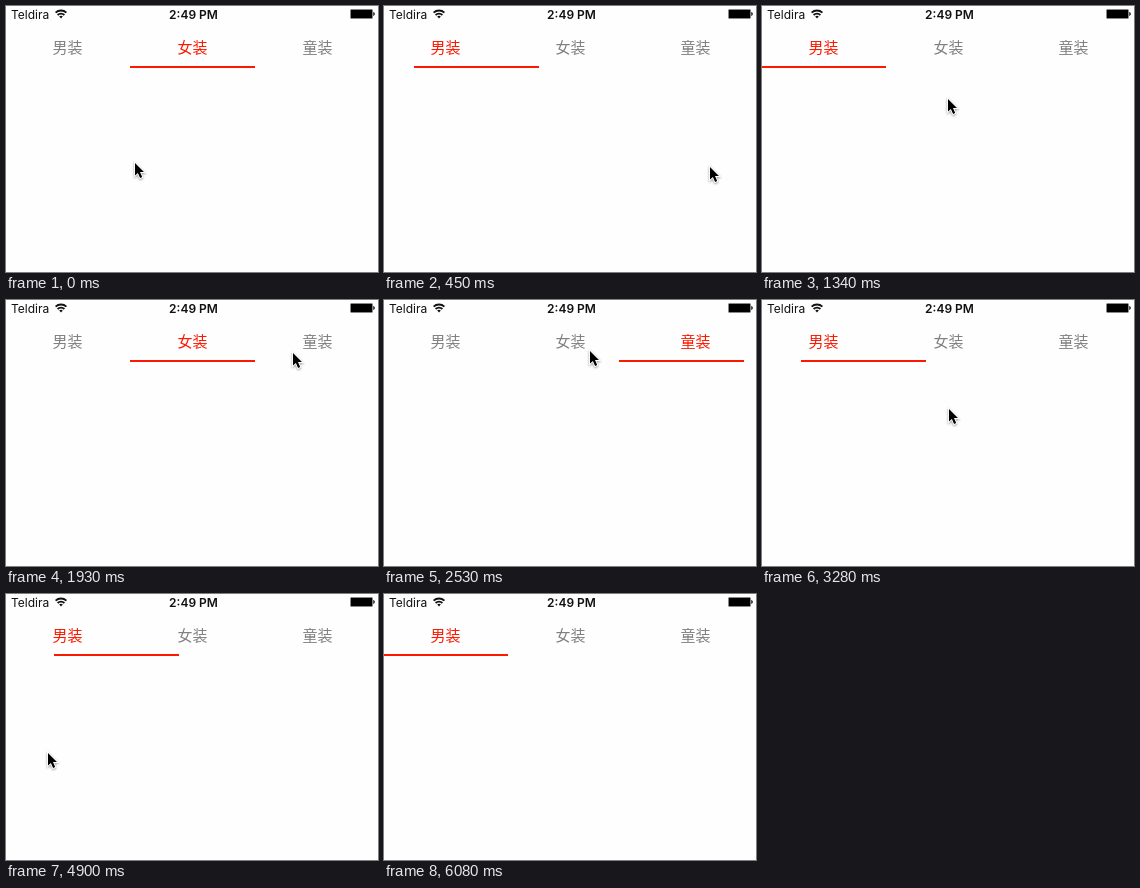
An HTML page for the animation above (6.68 s loop, 372 by 266 pixels).

```html
<!DOCTYPE html>
<html lang="zh-CN">
<head>
<meta charset="utf-8">
<title>Tabs</title>
<style>
  html, body { margin: 0; width: 100%; height: 100%; overflow: hidden; background: #fefefe; }
  svg { display: block; }
  .status { font: 12px Inter, "Liberation Sans", sans-serif; fill: #111; }
  .time { font-weight: 600; text-anchor: middle; }
  .tab { font: 300 15px "Noto Sans CJK SC", "Noto Sans CJK", sans-serif; text-anchor: middle; fill: #808080; }
  .tab.on, #line { fill: #fb1900; }
  #cursor { stroke: #fff; stroke-width: 1.8; paint-order: stroke; filter: drop-shadow(0 1px 1px rgba(0, 0, 0, .4)); }
</style>
</head>
<body>
<svg width="372" height="266" viewBox="0 0 372 266">
  <text class="status" x="5" y="12.5">Teldira</text>
  <text class="status time" x="187.5" y="12.5">2:49 PM</text>

  <g fill="none" stroke="#111" stroke-width="1.8">
    <path d="M49.6 6.7a7.7 7.7 0 0 1 10.8 0M51.6 9a4.8 4.8 0 0 1 6.8 0"/>
    <path d="M53.2 10.6a2.6 2.6 0 0 1 3.6 0L55 12.6z" fill="#111" stroke="none"/>
  </g>

  <rect x="344.5" y="3.5" width="22" height="9" rx="1" fill="#000" stroke="#888"/>
  <path d="M367.3 5.8q3 2.2 0 4.4z"/>

  <text class="tab" x="61.5" y="47">男装</text>
  <text class="tab" x="186.5" y="47">女装</text>
  <text class="tab" x="311.5" y="47">童装</text>
  <rect id="line" y="60" width="125" height="2"/>
  <path id="cursor" d="M1 1V13.6l2.9-2.7 2.2 5.1 2.1-.9-2.2-5h4z"/>
</svg>
<script>
const LOOP = 6680, STEP = 148.2, TAB_WIDTH = 125, CURSOR_GONE = 41;

// Key points are [step, ...values]; every leg between two of them eases out.
const pagePath = [
  [0, 1], [1, 1], [5, 0],           // swipe to the first tab
  [10, 0], [12, 1],                 // tap the second
  [15, 1], [18, 2],                 // tap the third
  [21, 2], [22.67, 0],              // tap the first
  [26.1, 0], [37, .455], [39, 0]    // drag partway, spring back
];
const cursorPath = [
  [0, 128, 156], [3, 325, 160], [6, 165, 152], [8, 186, 144], [11, 185, 50],
  [13, 286, 52], [16, 308, 43], [20, 73, 60], [21, 73, 60], [22, 186, 108],
  [26, 136, 150], [28, 85, 150], [33, 41, 158], [38, 28, 159]
];

const tabs = document.querySelectorAll('.tab');
const line = document.getElementById('line');
const cursor = document.getElementById('cursor');

const easeOut = p => 1 - (1 - p) ** 2;

function valuesAt(path, step) {
  const i = path.findLastIndex(point => point[0] <= step);
  const [begin, ...from] = path[i];
  if (i === path.length - 1) return from;
  const [end, ...to] = path[i + 1];
  const eased = easeOut((step - begin) / (end - begin));
  return from.map((v, n) => v + (to[n] - v) * eased);
}

function draw(now) {
  const step = Math.floor(now % LOOP / STEP);
  const [page] = valuesAt(pagePath, step);
  tabs.forEach((tab, i) => tab.classList.toggle('on', i === Math.round(page)));
  line.setAttribute('x', Math.round(page * TAB_WIDTH - 1));
  cursor.setAttribute('transform', `translate(${valuesAt(cursorPath, step).map(Math.round)})`);
  cursor.style.display = step < CURSOR_GONE ? '' : 'none';
}

const start = performance.now();
function tick() {
  draw(performance.now() - start);
  requestAnimationFrame(tick);
}
tick();
</script>
</body>
</html>
```
